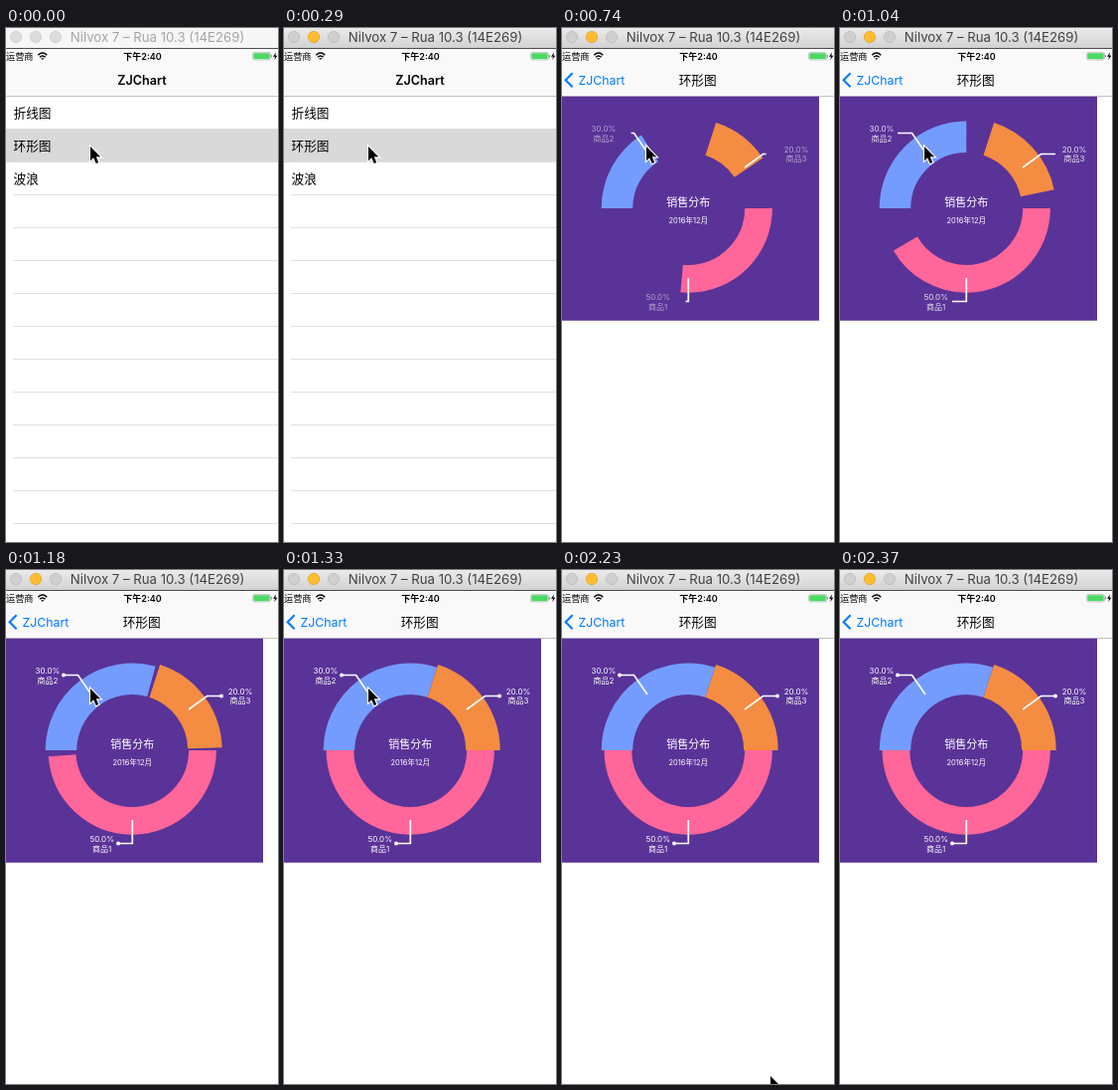
An HTML page for the animation above (2630 ms loop, 274x516 px).

```html
<!DOCTYPE html>
<html lang="zh-CN">
<head>
<meta charset="utf-8">
<title>ZJChart</title>
<style>
@property --p { syntax: "<number>"; inherits: true; initial-value: 0; }
html, body { margin: 0; width: 100%; height: 100%; overflow: hidden; background: #fff; }
svg { display: block; width: 274px; height: 516px; font-family: Inter, "Noto Sans CJK SC", "Noto Sans CJK", sans-serif; }
.bold { font-weight: 600; }
.medium { font-weight: 500; }
.mid { text-anchor: middle; }

/* Every part shares one clock and changes in hard steps. */
.inactive, .active, .list, .detail, .chart, .cursor { animation: 2630ms step-end infinite; }
.inactive { animation-name: before-focus; }
.active { animation-name: after-focus; }
.list { animation-name: before-push; }
.detail { animation-name: after-push; }
.chart { animation-name: grow; }
.cursor { animation-name: point; }
@keyframes before-focus { 0% { visibility: visible } 11.02%, 100% { visibility: hidden } }
@keyframes after-focus { 0% { visibility: hidden } 11.02%, 100% { visibility: visible } }
@keyframes before-push { 0% { visibility: visible } 22.43%, 100% { visibility: hidden } }
@keyframes after-push { 0% { visibility: hidden } 22.43%, 100% { visibility: visible } }
@keyframes grow {
  0% { --p: 0; transform: translate(1.8px) }
  22.43% { --p: .378; transform: translate(1.8px) }
  28.13% { --p: .53; transform: none }
  33.84% { --p: .68; transform: none }
  39.54% { --p: .833; transform: none }
  44.86% { --p: .976; transform: none }
  50.57%, 100% { --p: 1; transform: none }
}
@keyframes point {
  0% { transform: translate(85px, 119px) }
  79.08% { transform: translate(216px, 482.3px) }
  84.79% { transform: translate(210px, 508px) }
  90.11%, 100% { transform: translate(300px, 600px) }
}
.sectors path, .leaders path { fill: none; stroke-dasharray: 1px 2px; }
.sectors path { stroke-dashoffset: calc((1 - var(--p)) * 1px); }
.leaders path { stroke: #fff; stroke-width: 1.7; stroke-dashoffset: calc((1 - min(1, var(--p) * 1.31)) * 1px); }
.dots { fill: #fff; opacity: clamp(0, (var(--p) - .9) * 100, 1); }
.labels { fill: #fff; font-size: 8px; opacity: min(1, var(--p) * 1.03); }
</style>
</head>
<body>
<svg viewBox="0 0 274 516">
  <defs>
    <linearGradient id="bar" x2="0" y2="1">
      <stop stop-color="#ebebeb"/><stop offset="1" stop-color="#d2d2d2"/>
    </linearGradient>
  </defs>
  <rect width="274" height="516" fill="#fff"/>

  <g class="inactive">
    <path d="M0 0H274V20H0Z" fill="#f6f6f6"/>
    <g fill="#dcdcdc" stroke="#cacaca" stroke-width=".7">
      <circle cx="10" cy="9" r="5.7"/><circle cx="30" cy="9" r="5.7"/><circle cx="50" cy="9" r="5.7"/>
    </g>
    <text class="mid" x="152.5" y="14" font-size="13.2" fill="#a4a4a4">Nilvox 7 – Rua 10.3 (14E269)</text>
  </g>
  <g class="active">
    <path d="M0 0H274V20H0Z" fill="url(#bar)"/>
    <g fill="#cfcfcf" stroke="#b9b9b9" stroke-width=".7">
      <circle cx="10" cy="9" r="5.7"/><circle cx="50" cy="9" r="5.7"/>
      <circle cx="30" cy="9" r="5.7" fill="#fdbd2f" stroke="#dfa023"/>
    </g>
    <text class="mid" x="152.5" y="14" font-size="13.2" fill="#414141">Nilvox 7 – Rua 10.3 (14E269)</text>
  </g>

  <path d="M0 20H274V68H0Z" fill="#f9f9f9"/>
  <path d="M0 20.5H274" stroke="#4d4d4d"/>
  <path d="M0 68.6H274" stroke="#bcbcbe"/>
  <text x="0" y="31.7" font-size="9.2">运营商</text>
  <g fill="none" stroke="#000" stroke-width="1.4">
    <path d="M32.3 27.2Q36.8 23 41.3 27.2M34 29.2Q36.8 26.6 39.6 29.2"/>
    <path d="M35.1 30.2H38.5L36.8 32Z" fill="#000" stroke="none"/>
  </g>
  <text class="mid bold" x="137.5" y="31.7" font-size="9">下午2:40</text>
  <rect x="248.5" y="24.5" width="18" height="7.5" rx="1.6" fill="#fff" stroke="#b5b5b5" stroke-width=".7"/>
  <rect x="249.3" y="25.3" width="16.4" height="5.9" rx="1" fill="#4cd964"/>
  <path d="M267.3 27V29.6" stroke="#888"/>
  <path d="M272 24.5L269 28.8H271L270.3 32L273.4 27.7H271.4Z"/>

  <g class="list">
    <text class="mid bold" x="137" y="56.7" font-size="12.6">ZJChart</text>
    <path d="M0 101H274V135H0Z" fill="#d9d9d9"/>
    <path d="M140.5 134V516" stroke="#e0e0e2" stroke-width="267" stroke-dasharray="1 32"/>
    <g font-size="12.7">
      <text x="7.5" y="89.7">折线图</text>
      <text x="7.5" y="122.7">环形图</text>
      <text x="7.5" y="155.7">波浪</text>
    </g>
  </g>

  <g class="detail">
    <path d="M10.6 45.2L3.6 52.2L10.6 59.2" fill="none" stroke="#007aff" stroke-width="2.1"/>
    <text x="16.5" y="56.7" font-size="12.3" fill="#007aff">ZJChart</text>
    <text class="mid medium" x="136.7" y="56.7" font-size="12.7">环形图</text>
    <g class="chart">
      <path d="M-5 68.8H259V293.7H-5Z" fill="#5a3398"/>
      <g class="sectors" transform="translate(127.2 181)">
        <path pathLength="1" d="M70.8 0A70.8 70.8 0 0 1 -70.8 0" stroke="#ff6699" stroke-width="27.8"/>
        <path pathLength="1" d="M-71.75 0A71.75 71.75 0 0 1 22.17 -68.24" stroke="#749cff" stroke-width="31.5"/>
        <path pathLength="1" d="M22.63 -69.66A73.25 73.25 0 0 1 73.25 0" stroke="#f48c42" stroke-width="34.5"/>
      </g>
      <g class="leaders">
        <path pathLength="1" d="M127.3 251V274.5H113"/>
        <path pathLength="1" d="M86 125L72.5 105.5H58"/>
        <path pathLength="1" d="M184 140L202.5 126.5H217"/>
      </g>
      <g class="dots">
        <circle cx="113" cy="274.5" r="2"/><circle cx="58" cy="105.5" r="2"/><circle cx="217" cy="126.5" r="2"/>
      </g>
      <g class="labels mid">
        <text x="42" y="104">30.0%</text><text x="42" y="113.7">商品2</text>
        <text x="236" y="124.5">20.0%</text><text x="236" y="134.2">商品3</text>
        <text x="96.7" y="272.8">50.0%</text><text x="96.7" y="282.5">商品1</text>
      </g>
      <g class="mid" fill="#fff">
        <text x="127.3" y="178.8" font-size="11">销售分布</text>
        <text x="127.3" y="196.2" font-size="7.5">2016年12月</text>
      </g>
    </g>
  </g>

  <path class="cursor" d="M0 0V14.2L3.2 11.2L5.7 17L8.2 15.9L5.8 10.3H10.2Z" stroke="#fff" stroke-width="2.2" paint-order="stroke"/>
</svg>
</body>
</html>
```
